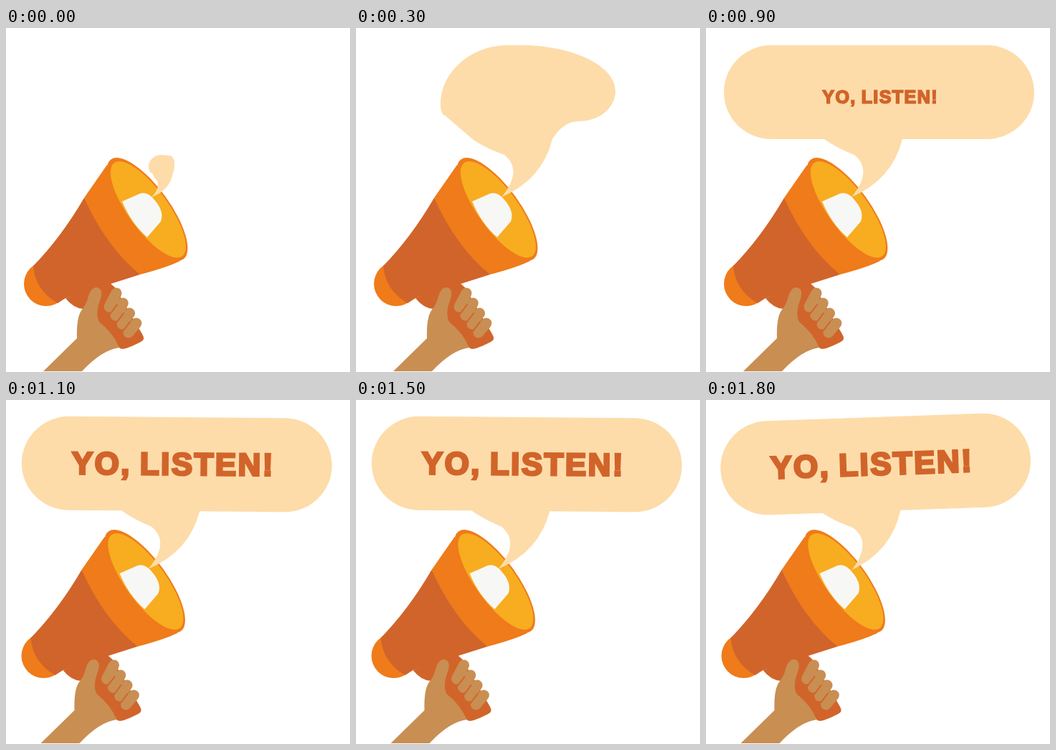
Recreate the animation shown at these times as an HTML page. Size 480 px wide and 480 px high, loop 1.9 s.

```html
<!DOCTYPE html>
<html lang="en">
<head>
<meta charset="utf-8">
<title>Megaphone</title>
<style>
  html, body { margin: 0; height: 100%; overflow: hidden; background: #fff; }
  svg { display: block; width: 100vw; height: 100vh; }
  .dark { fill: #d1642a; }
  .orange { fill: #ef7b1a; }
  .skin { fill: #c98e52; }
  #fingers { stroke: #c98e52; stroke-width: 15; stroke-linecap: round; }
  #gaps { stroke: #d1642a; stroke-width: 2; stroke-linecap: round; }
  text {
    font: bold 44px "Liberation Sans", Arial, sans-serif;
    letter-spacing: 2.4px; word-spacing: -2.5px; text-anchor: middle;
    fill: #d1642a; stroke: #d1642a; stroke-width: 3;
  }
</style>
</head>
<body>
<svg viewBox="0 0 480 480">
  <g id="scene">
    <!-- megaphone -->
    <circle class="orange" cx="56" cy="357" r="31"/>
    <path class="dark" d="M109 237Q77 292 38 332Q41 366 72 384L83 377L187 344Z"/>
    <path class="dark" d="M83 377Q94 391 108 392L158 446Q161 452 188 438Q195 435 190 427L152 362L144 355Z"/>
    <path class="orange" d="M109 237L141 191L243 325Q225 334 187 344Q140 306 109 237Z"/>
    <g transform="translate(197 253) rotate(54)">
      <ellipse class="orange" rx="86" ry="31"/>
      <ellipse fill="#f8ac20" cx="1" cy="-1" rx="80.6" ry="28"/>
    </g>
    <path fill="#f7f7f5" d="M162 242L187 231Q198 227 209 242Q221 257 216 270L197 292Q175 273 162 242Z"/>
    <!-- hand -->
    <path class="skin" d="M52 479L99 433Q98 403 106 393Q112 386 115 374Q119 361 127 362Q136 364 132 378Q124 398 130 410Q150 426 158 446Q134 449 106 479Z"/>
    <path id="fingers"/>
    <path id="gaps"/>
    <g id="balloon">
      <path id="bubble" fill="#fddcaa"/>
      <text id="words">YO, LISTEN!</text>
    </g>
  </g>
</svg>
<script>
const LOOP = 1900, STEP = 100;
const TIP = [203, 236];

const set = (id, name, value) => document.getElementById(id).setAttribute(name, value);
const clamp = x => Math.min(1, Math.max(0, x));
const mix = (a, b, k) => a + (b - a) * k;

// Four fingers side by side, with a thin crease between neighbours.
const row = (count, line) => Array.from({ length: count }, (_, i) => line(i)).join('');
set('fingers', 'd', row(4, i => `M${144 + 9 * i} ${389 + 12 * i}L${154 + 9.3 * i} ${370 + 14 * i}`));
set('gaps', 'd', row(3, i => `M${146 + 9 * i} ${398 + 12 * i}l9 -12`));

// Key points of the bubble, anticlockwise from the right side of its neck.
const pose = (neckR, lowR, right, topR, topL, left, lowL, shoulder, neckL) =>
  ({ neckR, lowR, right, topR, topL, left, lowL, shoulder, neckL });
const drop = pose([232, 207], [234, 200], [235, 188], [228, 178], [217, 177],
  [199, 193], [203, 202], [205, 204], [207, 209]);
const blob = pose([274, 155], [312, 130], [362, 88], [230, 24], [212, 24],
  [118, 107], [124, 122], [165, 157], [207, 177]);
const pill = pose([274, 155], [392, 155], [458, 90], [392, 24], [91, 24],
  [25, 90], [91, 155], [165, 155], [207, 177]);

// Quarter ellipses that leave or reach a point horizontally.
const arcFrom = ([x, y], [u, v]) => `C${mix(x, u, 0.55)} ${y} ${u} ${mix(v, y, 0.55)} ${u} ${v}`;
const arcTo = ([x, y], [u, v]) => `C${x} ${mix(y, v, 0.55)} ${mix(u, x, 0.55)} ${v} ${u} ${v}`;

function outline(from, to, k) {
  const p = {};
  for (const name in from) p[name] = from[name].map((v, i) => mix(v, to[name][i], k));
  const { neckR, neckL, lowR, shoulder } = p;
  const tailHeight = TIP[1] - neckL[1];
  return `M${TIP}Q${mix(TIP[0], neckR[0], 0.8)} ${mix(TIP[1], neckR[1], 0.3)} ${neckR}` +
    `Q${mix(neckR[0], lowR[0], 0.4)} ${lowR[1]} ${lowR}` +
    arcFrom(lowR, p.right) + arcTo(p.right, p.topR) +
    `L${p.topL}` + arcFrom(p.topL, p.left) + arcTo(p.left, p.lowL) +
    `L${shoulder}Q${mix(shoulder[0], neckL[0], 0.4)} ${mix(shoulder[1], neckL[1], 0.55)} ${neckL}` +
    `Q${neckL[0] + 0.45 * tailHeight} ${neckL[1] + 0.37 * tailHeight} ${TIP}Z`;
}

function draw(t) {
  set('bubble', 'd', t < 300
    ? outline(drop, blob, t / 300)
    : outline(blob, pill, clamp((t - 300) / 200)));

  const size = clamp((t - 700) / 350);
  set('words', 'transform', `translate(252 106) scale(${size}) translate(-15.5 -1.5)`);

  // Once the words are full size, everything sits slightly left and the bubble rocks.
  const rocking = t >= 1100;
  const tilt = rocking ? 0.5 + 2.5 * Math.cos((t - 1200) / 400 * 2 * Math.PI) : 0;
  set('scene', 'transform', `translate(${rocking ? -3.5 : 0} 0)`);
  set('balloon', 'transform', `rotate(${tilt} 241.5 128)`);
}

function tick() {
  const t = performance.now() % LOOP;
  draw(Math.floor(t / STEP) * STEP);
  requestAnimationFrame(tick);
}
tick();
</script>
</body>
</html>
```
